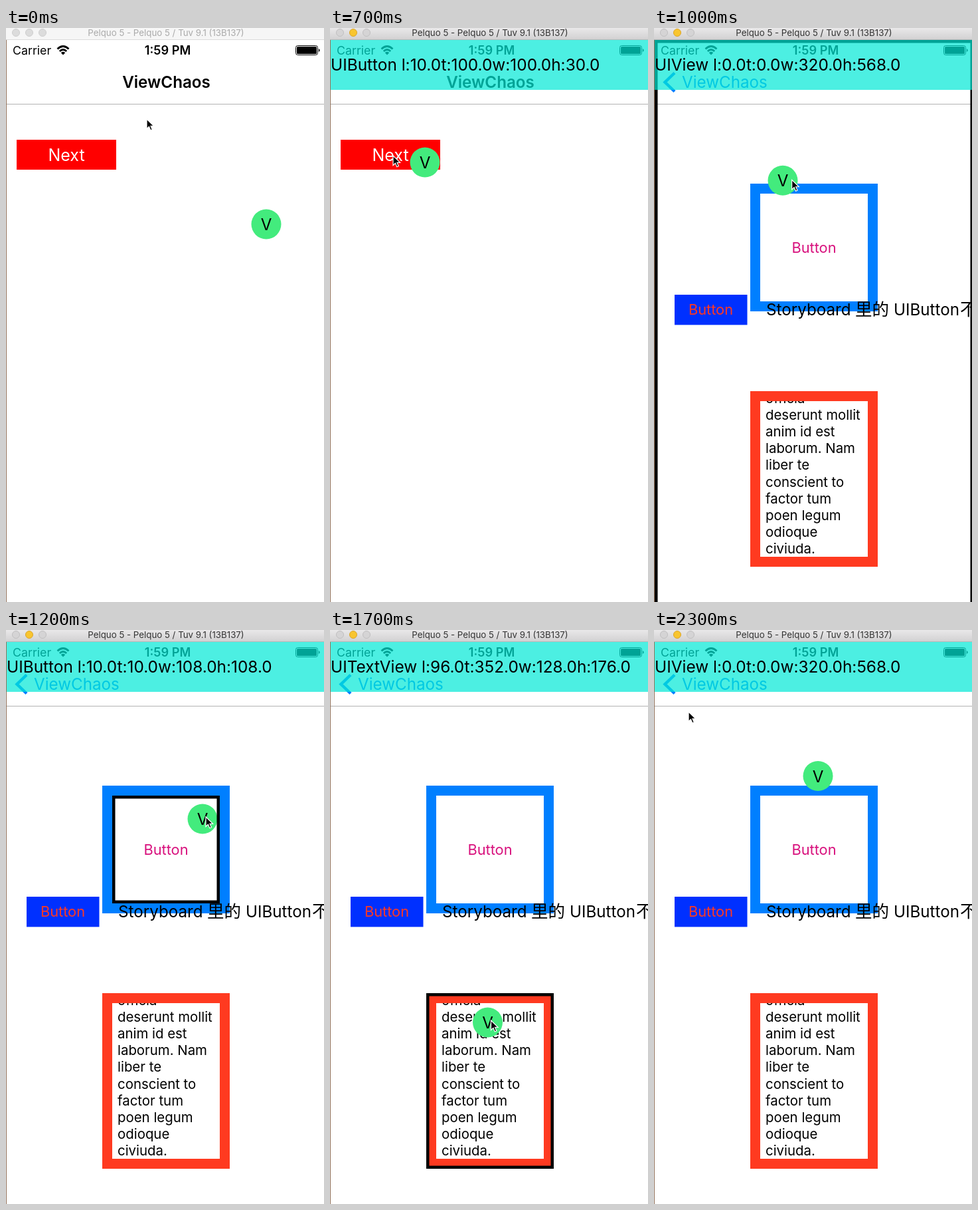
These frames come from a looping animation (479x863 px, 2.4 s). An HTML page:

```html
<!DOCTYPE html>
<html lang="en">
<head>
<meta charset="utf-8">
<title>View inspector</title>
<style>
html, body { margin: 0; width: 100%; height: 100%; overflow: hidden; background: #fff; }
svg { display: block; width: 479px; height: 863px; }
text { font-family: Inter, "Noto Sans CJK SC", "Noto Sans CJK", sans-serif; font-size: 24.2px; white-space: pre; }
.mid { text-anchor: middle; }
.bold { font-weight: 600; }
.small { font-size: 17.8px; }
.button { font-size: 21.8px; text-anchor: middle; }
.body { font-size: 20.4px; }
.cjk { font-family: "Noto Sans CJK SC", "Noto Sans CJK", sans-serif; font-size: 25.5px; }
#info { font-size: 24.4px; }
</style>
</head>
<body>
<svg viewBox="0 0 479 863">
  <defs>
    <linearGradient id="chrome" x2="0" y2="1">
      <stop stop-color="#e9e8e9"/><stop offset="1" stop-color="#d2d1d2"/>
    </linearGradient>
    <clipPath id="textClip"><rect x="160" y="561" width="162" height="234"/></clipPath>
  </defs>
  <rect width="479" height="863" fill="#fff"/>

  <g id="first">
    <rect x="16" y="168" width="150" height="45" fill="#f00"/>
    <text class="mid" x="91" y="200" fill="#fff" style="font-size:25px">Next</text>
  </g>

  <g id="second">
    <rect x="1" y="115" width="480" height="748" fill="#fff"/>
    <rect x="152.5" y="241.5" width="177" height="177" fill="#fff" stroke="#007fff" stroke-width="15"/>
    <text class="button" x="241" y="338" fill="#d8117d">Button</text>
    <rect x="31" y="401" width="109.5" height="45.4" fill="#0030ff"/>
    <text class="button" x="85.5" y="431" fill="#ff3823">Button</text>
    <text x="169" y="432">Storyboard</text>
    <text class="cjk" x="303" y="432">里的</text>
    <text x="361" y="432">UIButton</text>
    <text class="cjk" x="461" y="432">不</text>
    <rect x="152.5" y="553.5" width="177" height="249" fill="#fff" stroke="#ff3a20" stroke-width="15"/>
    <g id="lines" clip-path="url(#textClip)"></g>
  </g>

  <rect x="1" y="18" width="478" height="96" fill="#fff"/>
  <rect x="1" y="114" width="478" height="1" fill="#b2b2b2"/>
  <text id="title" class="mid bold" x="241.5" y="90">ViewChaos</text>
  <g id="back" fill="#007fff">
    <path d="M31 67.5L16.5 81.5L31 95.5" fill="none" stroke="#007fff" stroke-width="4.4"/>
    <text x="42" y="90">ViewChaos</text>
  </g>

  <text class="small" x="10" y="40">Carrier</text>
  <g fill="none" stroke="#000" stroke-width="2.8">
    <path d="M77.5 31.5Q86 23.5 94.5 31.5M80.8 35Q86 30 91.2 35"/>
    <path d="M86 40.5L82.8 37.2Q86 34.5 89.2 37.2Z" fill="#000" stroke="none"/>
  </g>
  <text class="mid bold" x="243.5" y="40" style="font-size:18.2px">1:59 PM</text>
  <rect x="436.5" y="26.5" width="33" height="14" rx="3" fill="none" stroke="#000"/>
  <rect x="438" y="28" width="30" height="11" rx="1.5"/>
  <path d="M471 31Q474.5 33.5 471 36Z"/>

  <g id="ball">
    <circle r="22.5" fill="#43eb7d"/>
    <text class="mid" y="9">V</text>
  </g>
  <rect id="frame" fill="none" stroke="#000"/>
  <g id="panel">
    <rect y="18" width="479" height="75" fill="rgb(0,233,214)" fill-opacity=".7"/>
    <text id="info" x="1" y="64"></text>
  </g>

  <rect width="1" height="863" fill="#93745c"/>
  <rect id="bar" width="479" height="17"/>
  <rect id="barLine" y="17" width="479" height="1"/>
  <g id="lights">
    <circle cx="15" cy="7" r="5.5"/>
    <circle id="yellow" cx="35" cy="7" r="5.5"/>
    <circle cx="55" cy="7" r="5.5"/>
  </g>
  <text id="caption" class="mid" x="241" y="12" style="font-size:13.3px">Pelquo 5 - Pelquo 5 / Tuv 9.1 (13B137)</text>

  <path id="cursor" d="M0 0V14.5L3.4 11.3L5.8 16.8L8.3 15.7L6 10.4H10.6Z" fill="#000" stroke="#fff" stroke-width="1.2"/>
</svg>
<script>
const $ = id => document.getElementById(id);
const set = (id, attrs) => {
  for (const name in attrs) $(id).setAttribute(name, attrs[name]);
};
const clamp = v => Math.min(1, Math.max(0, v));

const STEP = 100, STEPS = 24;
const SCALE = 1.5, LEFT = 1, TOP = 18, BORDER = 4.5;
const DROP = 6, PUSH = 7, GRAB = 9, END = 22;

const copy = ["officia", "deserunt mollit", "anim id est", "laborum. Nam", "liber te",
  "conscient to", "factor tum", "poen legum", "odioque", "civiuda."];
$("lines").innerHTML = copy.map((line, i) =>
  `<text class="body" x="168" y="${564 + i * 25.1}">${line}</text>`).join("");

// Key points: step, x, y
const firstDrag = [[2, 392, 295], [4, 335, 289], [DROP, 143, 202]];
const secondDrag = [[GRAB, 143, 202], [12, 296, 284], [15, 109, 418], [16, 175, 590],
  [18, 300, 590], [19, 385, 354], [END, 247, 219.5]];
const offset = (path, dx, dy) => path.map(([s, x, y]) => [s, x + dx, y + dy]);

const ballPath = [...firstDrag, ...secondDrag];
const cursorPath = [
  [0, 212, 137], ...offset(firstDrag, -1, -5.5),
  [PUSH, 95, 192], [GRAB, 161, 202],
  ...offset(secondDrag.slice(1), 5, -3), [END + 1, 52, 123]
];

function pointAt(path, step) {
  const found = path.findIndex(p => p[0] >= step);
  const i = found < 0 ? path.length - 1 : Math.max(1, found);
  const a = path[i - 1], b = path[i];
  const k = clamp((step - a[0]) / (b[0] - a[0]));
  return [a[1] + (b[1] - a[1]) * k, a[2] + (b[2] - a[2]) * k];
}

// Views from back to front, in points: class, box, parent origin
const root = ["UIView", [0, 0, 320, 568]];
const screens = [
  [root, ["UIButton", [10, 100, 100, 30]]],
  [root,
    ["UIView", [96, 144, 128, 128]],
    ["UIButton", [10, 10, 108, 108], [96, 144]],
    ["UIButton", [20, 255, 73, 30]],
    ["UIButtonLabel", [13.5, 6, 46, 18], [20, 255.5]],
    ["UITextView", [96, 352, 128, 176]]]
];

function screenRect([, [l, t, w, h], [px, py] = [0, 0]]) {
  return { x: LEFT + (l + px) * SCALE, y: TOP + (t + py) * SCALE, width: w * SCALE, height: h * SCALE };
}

function hit(views, [x, y]) {
  return views.filter(view => {
    const r = screenRect(view);
    return x >= r.x && x <= r.x + r.width && y >= r.y && y <= r.y + r.height;
  }).pop();
}

function drawWindow(active) {
  set("bar", { fill: active ? "url(#chrome)" : "#f6f6f6" });
  set("barLine", { fill: active ? "#b9b8b9" : "#dadada" });
  set("caption", { fill: active ? "#333" : "#aaa" });
  set("lights", { fill: active ? "#d5d4d5" : "#dcdcdc", stroke: active ? "#c0bfc0" : "#cecece" });
  set("yellow", { fill: active ? "#f8c52f" : "inherit", stroke: active ? "#dba52a" : "inherit" });
}

function drawPush(step) {
  const p = 1 - (1 - clamp((step - PUSH) / 2)) ** 2;
  set("first", { transform: `translate(${-144 * p} 0)` });
  set("second", { transform: `translate(${480 * (1 - p)} 0)` });
  set("title", { transform: `translate(${-136 * p} 0)`, opacity: 1 - p });
  set("back", { transform: `translate(${133 * (1 - p)} 0)`, opacity: p });
}

function drawInspector(step, ball) {
  const resting = step > DROP && step <= GRAB;
  const fade = resting ? 1 - 0.145 * (step - PUSH) ** 2 : 1;
  const visible = step > 2;
  set("panel", { opacity: visible ? fade : 0 });
  set("frame", { opacity: visible && !resting && step <= END ? 1 : 0 });

  const view = hit(screens[step <= GRAB ? 0 : 1], ball);
  const r = screenRect(view);
  set("frame", {
    x: r.x + BORDER / 2, y: r.y + BORDER / 2,
    width: r.width - BORDER, height: r.height - BORDER, "stroke-width": BORDER
  });
  const [kind, box] = view;
  $("info").textContent = kind + " " + box.map((v, i) => "ltwh"[i] + ":" + v.toFixed(1)).join("");
}

let shown = -1;
function draw(now) {
  const step = Math.floor(now / STEP) % STEPS;
  if (step === shown) return;
  shown = step;
  const ball = pointAt(ballPath, step);
  drawWindow(step >= 2);
  drawPush(step);
  drawInspector(step, ball);
  set("ball", { transform: `translate(${ball})` });
  set("cursor", { transform: `translate(${pointAt(cursorPath, step)})` });
}

const start = performance.now();
function tick() {
  draw(performance.now() - start);
  requestAnimationFrame(tick);
}
tick();
</script>
</body>
</html>
```
